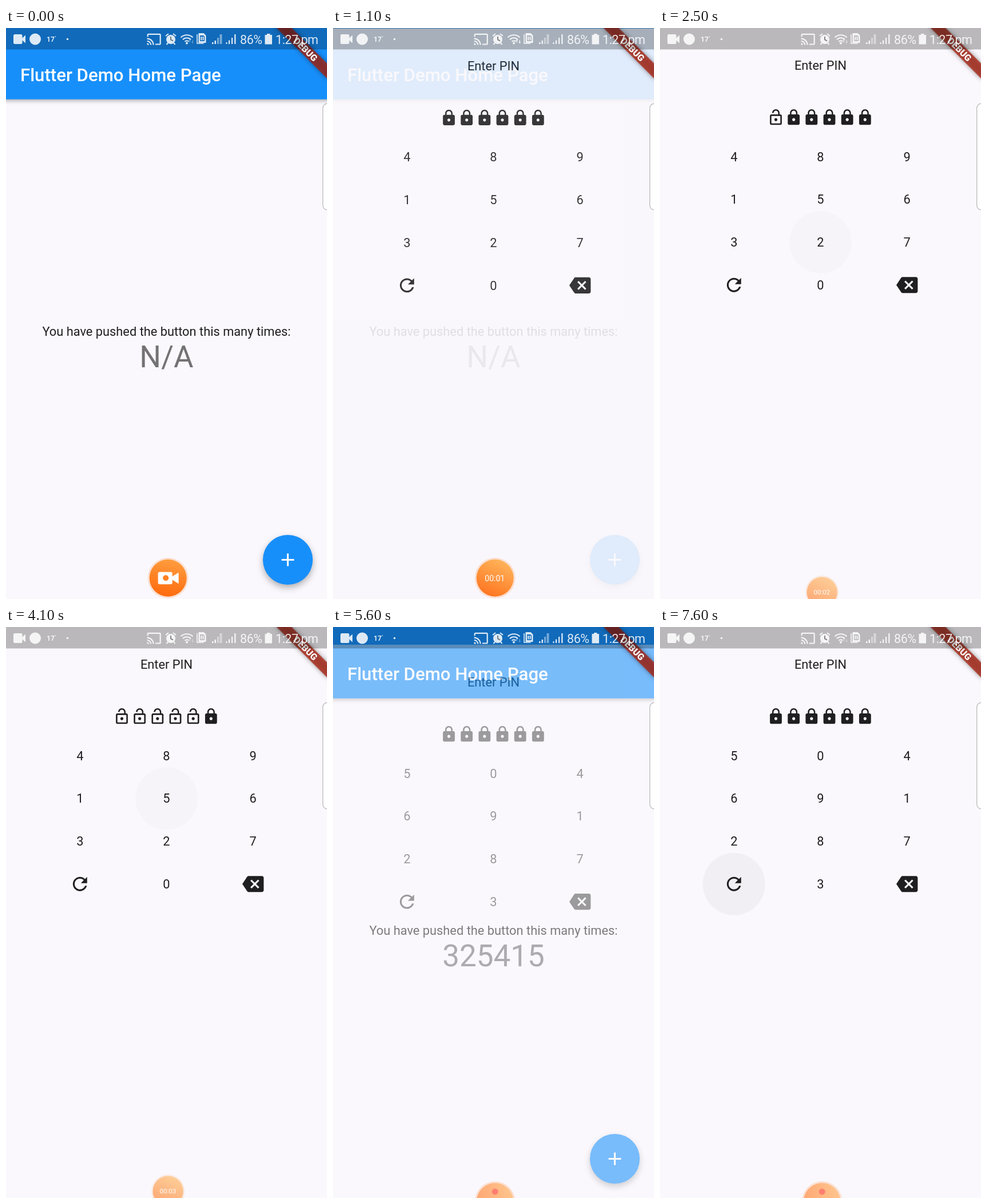
An HTML page for the animation above (8000 ms loop, 561 px wide and 998 px high).

```html
<!DOCTYPE html>
<html lang="en">
<head>
<meta charset="utf-8">
<title>PIN entry demo</title>
<style>
  html, body { margin: 0; width: 100%; height: 100%; overflow: hidden; background: #faf8fc; }
  svg { display: block; width: 561px; height: 998px; font-family: Roboto, Arial, sans-serif; }
  .mid { text-anchor: middle; }
  .body { font-size: 21.82px; fill: #1f1e20; }
  .blue { fill: #178ffa; }
  .ink { fill: #1f1e20; }
  .bar { filter: drop-shadow(0 3px 3px rgba(0,0,0,.28)); }
  .fab { filter: drop-shadow(0 5px 6px rgba(0,0,0,.3)); }
  .ribbon { filter: drop-shadow(0 0 4px rgba(0,0,0,.5)); }
  .line { fill: none; stroke: #fff; stroke-width: 2; }
</style>
</head>
<body>
<svg viewBox="0 0 561 998">
  <defs>
    <linearGradient id="hot" x1=".6" y1="0" x2=".4" y2="1">
      <stop offset="0" stop-color="#ff9d3f"/><stop offset="1" stop-color="#ff6a0c"/>
    </linearGradient>
    <linearGradient id="warm" x1=".75" y1="0" x2=".3" y2="1">
      <stop offset="0" stop-color="#ffb65c"/><stop offset="1" stop-color="#ff7420"/>
    </linearGradient>
    <linearGradient id="dock" x1="0" y1=".6" x2="1" y2=".3">
      <stop offset="0" stop-color="#ffa673"/><stop offset="1" stop-color="#ffc58d"/>
    </linearGradient>
    <path id="shut" d="M18 8h-1V6c0-2.76-2.24-5-5-5S7 3.24 7 6v2H6c-1.1 0-2 .9-2 2v10c0 1.1.9 2 2 2h12c1.1 0 2-.9 2-2V10c0-1.1-.9-2-2-2zm-6 9c-1.1 0-2-.9-2-2s.9-2 2-2 2 .9 2 2-.9 2-2 2zm3.1-9H8.9V6c0-1.71 1.39-3.1 3.1-3.1 1.71 0 3.1 1.39 3.1 3.1v2z"/>
    <path id="open" d="M12 17c1.1 0 2-.9 2-2s-.9-2-2-2-2 .9-2 2 .9 2 2 2zm6-9h-1V6c0-2.76-2.24-5-5-5S7 3.24 7 6h1.9c0-1.71 1.39-3.1 3.1-3.1 1.71 0 3.1 1.39 3.1 3.1v2H6c-1.1 0-2 .9-2 2v10c0 1.1.9 2 2 2h12c1.1 0 2-.9 2-2V10c0-1.1-.9-2-2-2zm0 12H6V10h12v10z"/>
  </defs>

  <g id="home">
    <rect width="561" height="998" fill="#faf8fc"/>
    <rect class="blue bar" x="-10" y="-10" width="581" height="134.7"/>
    <text x="25" y="93" font-size="31.17" font-weight="500" fill="#fff">Flutter Demo Home Page</text>
    <text class="mid body" x="280.5" y="538">You have pushed the button this many times:</text>
    <text id="total" class="mid" x="280.5" y="593.3" font-size="53" fill="#000" fill-opacity=".54"></text>
    <circle class="blue fab" cx="492.5" cy="929.5" r="43.6"/>
    <path class="line" stroke-width="3.1" d="M481.6 929.5h21.8M492.5 918.6v21.8" style="stroke-width:3.1"/>
  </g>

  <g id="pin">
    <rect width="561" height="998" fill="#faf8fc"/>
    <circle id="press" r="54.5"/>
    <text class="mid body" x="280.5" y="73.3">Enter PIN</text>
    <g id="locks" class="ink"></g>
    <g id="keys" class="mid body"></g>
    <path class="ink" transform="translate(110.6 430.5) scale(1.558)" d="M17.65 6.35C16.2 4.9 14.21 4 12 4c-4.42 0-7.99 3.58-7.99 8s3.57 8 7.99 8c3.73 0 6.84-2.55 7.73-6h-2.08c-.82 2.33-3.04 4-5.65 4-3.31 0-6-2.69-6-6s2.69-6 6-6c1.66 0 3.14.69 4.22 1.78L13 11h7V4l-2.35 2.35z"/>
    <path class="ink" transform="translate(413 430.5) scale(1.558)" d="M22 3H7c-.69 0-1.23.35-1.59.88L0 12l5.41 8.11c.36.53.9.89 1.59.89h15c1.1 0 2-.9 2-2V5c0-1.1-.9-2-2-2zm-3 12.59L17.59 17 14 13.41 10.41 17 9 15.59 12.59 12 9 8.41 10.41 7 14 10.59 17.59 7 19 8.41 15.41 12 19 15.59z"/>
  </g>

  <!-- debug ribbon -->
  <g transform="translate(561 0) rotate(45)">
    <rect class="ribbon" x="-64" y="43.6" width="128" height="18.7" fill="#a72110" fill-opacity=".78"/>
    <text class="mid" y="58.6" font-size="15.9" font-weight="900" fill="#fff">DEBUG</text>
  </g>

  <rect x="553.7" y="132" width="20" height="186" rx="8" fill="#fff" stroke="#b4b3b6" stroke-width="1.2"/>

  <!-- status bar -->
  <rect width="561" height="37.5" fill-opacity=".26"/>
  <g fill="#fff" opacity=".86">
    <rect x="13" y="11" width="15.5" height="17" rx="2.5"/>
    <path d="M28 18l6-5.5v14L28 21z"/>
    <circle cx="51" cy="19.5" r="10"/>
    <text x="71" y="24.3" font-size="12" font-weight="700">17˙</text>
    <circle cx="107.5" cy="19.5" r="1.8"/>
    <path transform="translate(245.5 6.5) scale(1.1)" d="M21 3H3c-1.1 0-2 .9-2 2v3h2V5h18v14h-7v2h7c1.1 0 2-.9 2-2V5c0-1.1-.9-2-2-2zM1 18v3h3c0-1.66-1.34-3-3-3zm0-4v2c2.76 0 5 2.24 5 5h2c0-3.87-3.13-7-7-7zm0-4v2c4.97 0 9 4.03 9 9h2c0-6.08-4.93-11-11-11z"/>
    <circle cx="288" cy="20" r="8"/>
    <path class="line" d="M279 14l5-4M297 14l-5-4M283 26l-2.5 3M293 26l2.5 3"/>
    <path class="line" d="M288 15v5.5l4 2" style="stroke:#000;stroke-opacity:.5"/>
    <path class="line" d="M305.5 16.5a15 15 0 0 1 21 0M309 20.2a10 10 0 0 1 14 0M312.5 23.8a5 5 0 0 1 7 0"/>
    <circle cx="316" cy="26.5" r="2"/>
    <path id="net" d="M320.5 25.5h1.4v-3.3h1.4l-2.1-2.7-2.1 2.7h1.4zM325.5 21v3.4h-1.4l2.1 2.8 2.1-2.8h-1.4V21z"/>
    <path class="line" d="M334 11v16h11.5" style="stroke-width:1.6"/>
    <path fill-rule="evenodd" d="M336.5 9h9l4 4v13h-13zM339 13v10h8v-8.500l-2-1.500zM340.300 15h2v6.500h-2zM343.600 15h2v6.500h-2z"/>
    <path d="M360 25h2.500v3H360zM364.500 22h2.500v6h-2.500z"/>
    <path opacity=".5" d="M369 17h3v11h-3zM373.500 11h4v17h-4z"/>
    <path d="M384.500 25h2v3h-2zM389 21.500h2.200v6.500H389zM394 17h2.200v11H394zM399.200 11h2.300v17h-2.300z"/>
    <g font-size="21.6" letter-spacing="-.5"><text x="409" y="27.500">86%</text><text x="471" y="27.500">1:27 pm</text></g>
    <path d="M456 10h5.500v2h3.500v16.500h-12.500V12h3.500z"/>
  </g>

  <!-- recorder bubble -->
  <g id="bubble">
    <circle r="35.500" fill="#fbe0d2"/>
    <circle id="disc" r="32.500"/>
    <g id="camera" fill="#fff">
      <rect x="-17.500" y="-10.500" width="25" height="21.500" rx="3"/>
      <path d="M7 -2.500L18.500 -9.500V10L7 3z"/>
      <circle cx="-4" r="5" fill="#ff8022"/>
    </g>
    <text id="clock" class="mid" x="-.5" y="5.200" font-size="14" fill="#fff"></text>
    <circle id="dot" cx="0" cy="-17.300" r="5.500" fill="#ff7f70"/>
  </g>
</svg>
<script>
const LOOP = 8000, STEP = 100;
const $ = id => document.getElementById(id);

// Each track is a list of [start time, value]; values hold until the next entry.
const PAGE = [[0, 0], [900, .26], [1000, .6], [1100, .93], [1200, 1],
  [4200, .43], [4300, .1], [4400, 0], [5600, .6], [5700, 1]];
const OPENED = [[0, 0], [2200, 1], [2600, 2], [3000, 3], [3400, 4], [3800, 5], [4200, 6],
  [5000, 0], [6300, 1], [6800, 2], [7500, 3], [7600, 0]];
const LAYOUT = [[0, '4891563270'], [5000, '5046912873']];
const TOTAL = [[0, 'N/A'], [4200, '325415']];
const CLOCK = [[0, ''], [100, '00:00'], [600, '00:01'], [2200, '00:02'], [3300, '00:03'],
  [4200, '00:04'], [5200, '']];
const NET = [[0, .35], [900, .95], [2100, .6], [2900, .4]];
// [start, end, column, row, strength]
const TAPS = [[2100, 2300, 0, 2, .014], [2500, 2700, 1, 2, .014], [2900, 3100, 1, 1, .014],
  [3300, 3500, 0, 0, .014], [3700, 3900, 0, 1, .014], [4000, 4200, 1, 1, .016],
  [6200, 6400, 0, 1, .014], [6700, 6900, 1, 2, .014], [7100, 7300, 1, 2, .014],
  [7500, 7600, 0, 3, .02], [7600, 8000, 0, 3, .037]];

const at = (track, t) => track.filter(e => e[0] <= t).pop()[1];
const colX = c => 129.3 + 151.2 * c;
const rowY = r => 224.8 + 74.85 * r;

function bezier(x1, y1, x2, y2) {
  const f = (s, a, b) => 3 * (1 - s) * (1 - s) * s * a + 3 * (1 - s) * s * s * b + s ** 3;
  return x => {
    let lo = 0, hi = 1;
    for (let i = 0; i < 24; i++) {
      const m = (lo + hi) / 2;
      f(m, x1, x2) < x ? lo = m : hi = m;
    }
    return f(lo, y1, y2);
  };
}
const fade = bezier(.42, 0, 1, 1), slide = bezier(.4, 0, .2, 1);

function add(parent, tag, attrs) {
  const el = document.createElementNS('http://www.w3.org/2000/svg', tag);
  for (const k in attrs) el.setAttribute(k, attrs[k]);
  return parent.appendChild(el);
}
const locks = Array.from({ length: 6 }, (_, i) => add($('locks'), 'use',
  { transform: `translate(${186.9 + 31.17 * i} 140.7) scale(1.3)` }));
const keys = Array.from({ length: 10 }, (_, i) => add($('keys'), 'text',
  { x: colX(i < 9 ? i % 3 : 1), y: rowY(Math.floor(i / 3)) + 7.8 }));

function drawBubble(t) {
  const docked = t >= 5200, camera = t < 100;
  const k = Math.min(1, Math.max(0, (t - 1200) / 500));
  const y = docked ? 1004 : 961.3 + 24.9 * k;
  const size = docked ? .99 : 1 - .18 * k;
  $('bubble').setAttribute('transform', `translate(283.2 ${y}) scale(${size})`);
  $('bubble').setAttribute('opacity', docked ? 1 : 1 - .38 * k);
  $('disc').setAttribute('fill', `url(#${docked ? 'dock' : camera ? 'hot' : 'warm'})`);
  $('camera').setAttribute('visibility', camera ? 'visible' : 'hidden');
  $('dot').setAttribute('visibility', docked ? 'visible' : 'hidden');
  $('clock').textContent = at(CLOCK, t);
}

function draw(t) {
  const p = at(PAGE, t), opened = at(OPENED, t), layout = at(LAYOUT, t);
  $('pin').setAttribute('opacity', fade(p).toFixed(4));
  $('pin').setAttribute('transform', `translate(0 ${(249.5 * (1 - slide(p))).toFixed(2)})`);
  $('pin').setAttribute('visibility', p ? 'visible' : 'hidden');
  locks.forEach((el, i) => el.setAttribute('href', i < opened ? '#open' : '#shut'));
  keys.forEach((el, i) => el.textContent = layout[i]);
  const [, , c, r, strength] = TAPS.find(e => e[0] <= t && t < e[1]) || [0, 0, 0, 0, 0];
  $('press').setAttribute('cx', colX(c));
  $('press').setAttribute('cy', rowY(r));
  $('press').setAttribute('fill-opacity', strength);
  $('total').textContent = at(TOTAL, t);
  $('net').setAttribute('opacity', at(NET, t));
  drawBubble(t);
}

const begin = performance.now();
let shown = -1;
function tick() {
  const t = Math.floor((performance.now() - begin) % LOOP / STEP) * STEP;
  if (t !== shown) draw(shown = t);
  requestAnimationFrame(tick);
}
tick();
</script>
</body>
</html>
```
